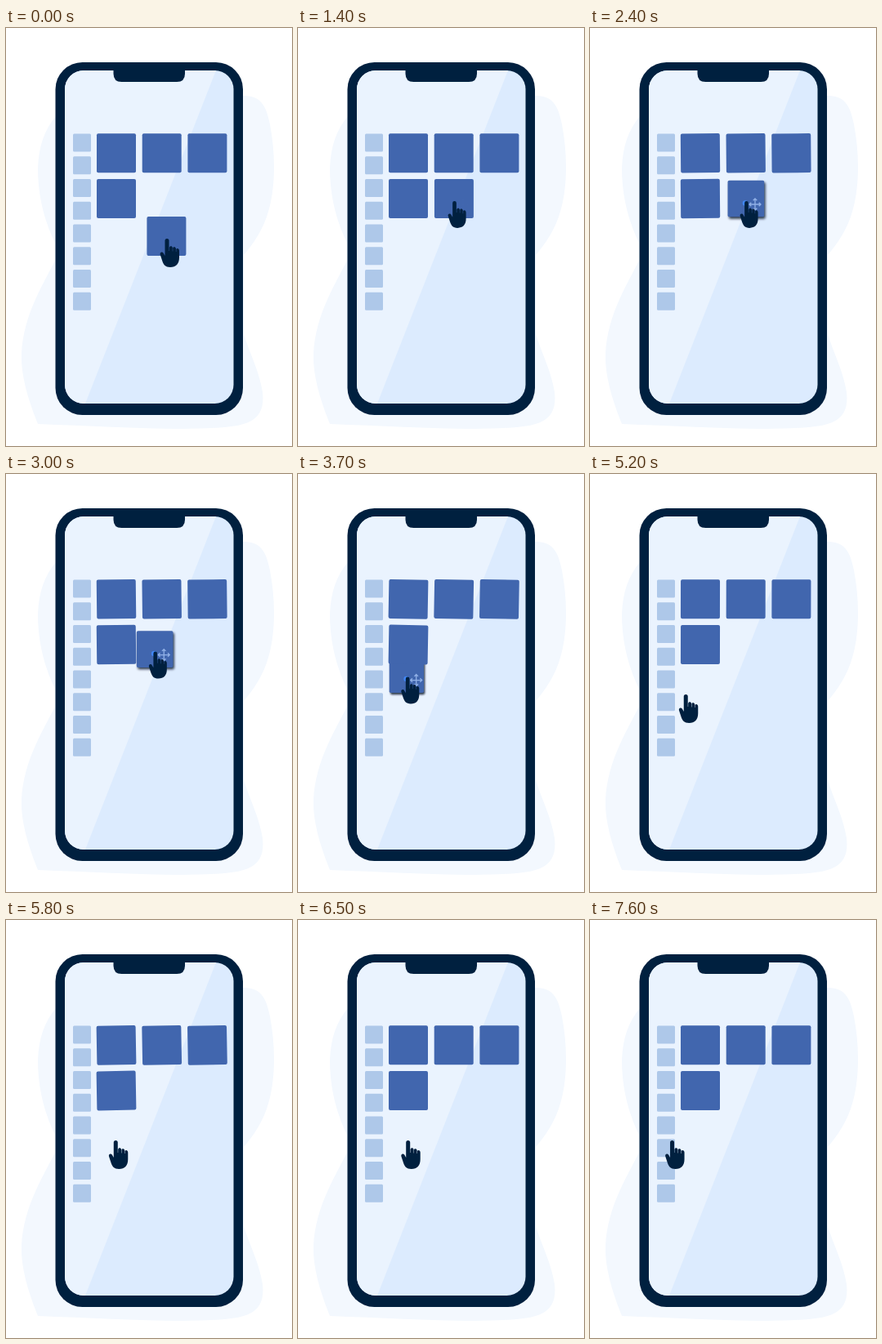
An HTML page that plays this animation: 350x512 px, repeating every 8000 ms.

```html
<!DOCTYPE html>
<html lang="en">
<head>
<meta charset="utf-8">
<title>Drag a tile to the sidebar</title>
<style>
  html, body { margin: 0; width: 100%; height: 100%; overflow: hidden; background: #fff; }
  svg { display: block; width: 100%; height: 100%; }
</style>
</head>
<body>
<svg viewBox="0 0 350 512" xmlns="http://www.w3.org/2000/svg">
  <defs>
    <clipPath id="screen"><rect x="72" y="52" width="206.5" height="408" rx="23"/></clipPath>
    <filter id="blur" x="-20%" y="-20%" width="140%" height="140%"><feGaussianBlur stdDeviation="1.5"/></filter>
  </defs>

  <path fill="#f3f8fe" d="M200 83H290C311 83 318 93 323 118C331 160 330 207 316 239C308 257 300 267 291 278V375C298 398 310 420 314 446C317 475 304 486 268 489C210 494 120 488 39 485C24 448 18 420 19 398C22 352 42 320 60 285V263C45 233 39 201 39 172C40 145 47 124 62 107Z"/>

  <rect x="60.5" y="42" width="229.5" height="432" rx="33" fill="#00203f"/>
  <g clip-path="url(#screen)">
    <path fill="#dcebfe" d="M72 52H279V461H72Z"/>
    <path fill="#eaf3fe" d="M72 52H257L97 460H72Z"/>
  </g>
  <path fill="#00203f" d="M131.500 50H219V56Q219 66 209 66H141.500Q131.500 66 131.500 56Z"/>

  <g id="side" fill="#aec8e9"></g>
  <g id="drag">
    <rect id="shadow" x="-22.500" y="-21.500" width="48" height="48" rx="2" fill="#000c20" filter="url(#blur)"/>
    <rect x="-24" y="-24" width="48" height="48" rx="2" fill="#4166ae"/>
  </g>
  <g id="tiles" fill="#4166ae"></g>

  <g id="pointer">
    <g id="cues">
      <circle cx="-1.500" cy="2.500" r="3.300" fill="#4187f5"/>
      <path transform="translate(10.500 4)" fill="none" stroke="#91b1e7" stroke-width="1.300" d="M-7 0H7M0-7V7M-2.300-4.700L0-7L2.300-4.700M-2.300 4.700L0 7L2.300 4.700M-4.700-2.300L-7 0L-4.700 2.300M4.700-2.300L7 0L4.700 2.300"/>
    </g>
    <path id="hand" fill="#00203f" d="M-2.500 2.500a2.500 2.500 0 0 1 5 0V15h.4V11c.4-2.300 3.500-2.300 3.900 0v4.500h.4v-4c.5-2 3.300-1.800 3.700.6v4h.4v-3c.6-1.700 3.600-1.300 3.700 1.700V23C15 31 11 35 4 35C-2 35-4 32-5.500 28L-8.300 19.500C-9 16.300-5.600 15.300-4.200 18L-2.500 21Z"/>
  </g>
</svg>

<script>
const LOOP = 8000;
const SVG = 'http://www.w3.org/2000/svg';
const $ = id => document.getElementById(id);
const set = (el, name, value) => el.setAttribute(name, value);
const mix = (a, b, p) => a + (b - a) * p;

// Sine ease from 0 to 1 between two times
function ease(t, from, to) {
  const u = Math.min(1, Math.max(0, (t - from) / (to - from)));
  return (1 - Math.cos(Math.PI * u)) / 2;
}

// Eased value along moves of [start, end, target]
const follow = (t, first, moves) =>
  moves.reduce((v, [from, to, target]) => mix(v, target, ease(t, from, to)), first);

function addTile(parent, x, y, size, rx) {
  const r = document.createElementNS(SVG, 'rect');
  Object.entries({ x, y, width: size, height: size, rx }).forEach(([k, v]) => set(r, k, v));
  $(parent).append(r);
  return { el: r, cx: x + size / 2, cy: y + size / 2 };
}

for (let i = 0; i < 8; i++) addTile('side', 82, 129.4 + i * 27.75, 22, 1.5);

const tiles = [0, 1, 2, 3].map(i =>
  addTile('tiles', 111 + (i % 3) * 55.7, 129.3 + Math.floor(i / 3) * 55.7, 48, 2));

function draw(t) {
  const x = follow(t, 197, [[0, 1080, 191.5], [2634, 4462, 100.5], [4520, 5900, 134.7], [6830, 7620, 100.5]]);
  const y = follow(t, 258, [[0, 1080, 212], [2634, 4462, 270]]);
  const press = follow(t, 0, [[400, 1080, 1], [4200, 4460, 0]]);
  const lift = ease(t, 1350, 2200);
  const drop = ease(t, 3500, 4450);
  const fade = 1 - ease(t, 4180, 4430);

  set($('pointer'), 'transform', `translate(${x} ${y})`);
  set($('hand'), 'transform', `scale(${1 - 0.06 * press})`);
  set($('cues'), 'opacity', lift * fade);

  const size = mix(1 - 0.07 * lift, 0.46, drop);
  const dx = mix(-0.6, -7.5, drop);
  const dy = mix(-3, 9, drop);
  set($('drag'), 'transform', `translate(${x + dx} ${y + dy}) scale(${size})`);
  set($('drag'), 'opacity', fade);
  set($('shadow'), 'opacity', 0.8 * lift);

  const tilt = follow(t, 0, [[2200, 2600, -1], [2600, 4400, 2], [4500, 5700, -1], [5800, 6550, 0]]);
  tiles.forEach(({ el, cx, cy }) => set(el, 'transform', `rotate(${tilt} ${cx} ${cy})`));
}

const start = performance.now();
function tick() {
  draw((performance.now() - start) % LOOP);
  requestAnimationFrame(tick);
}
tick();
</script>
</body>
</html>
```
